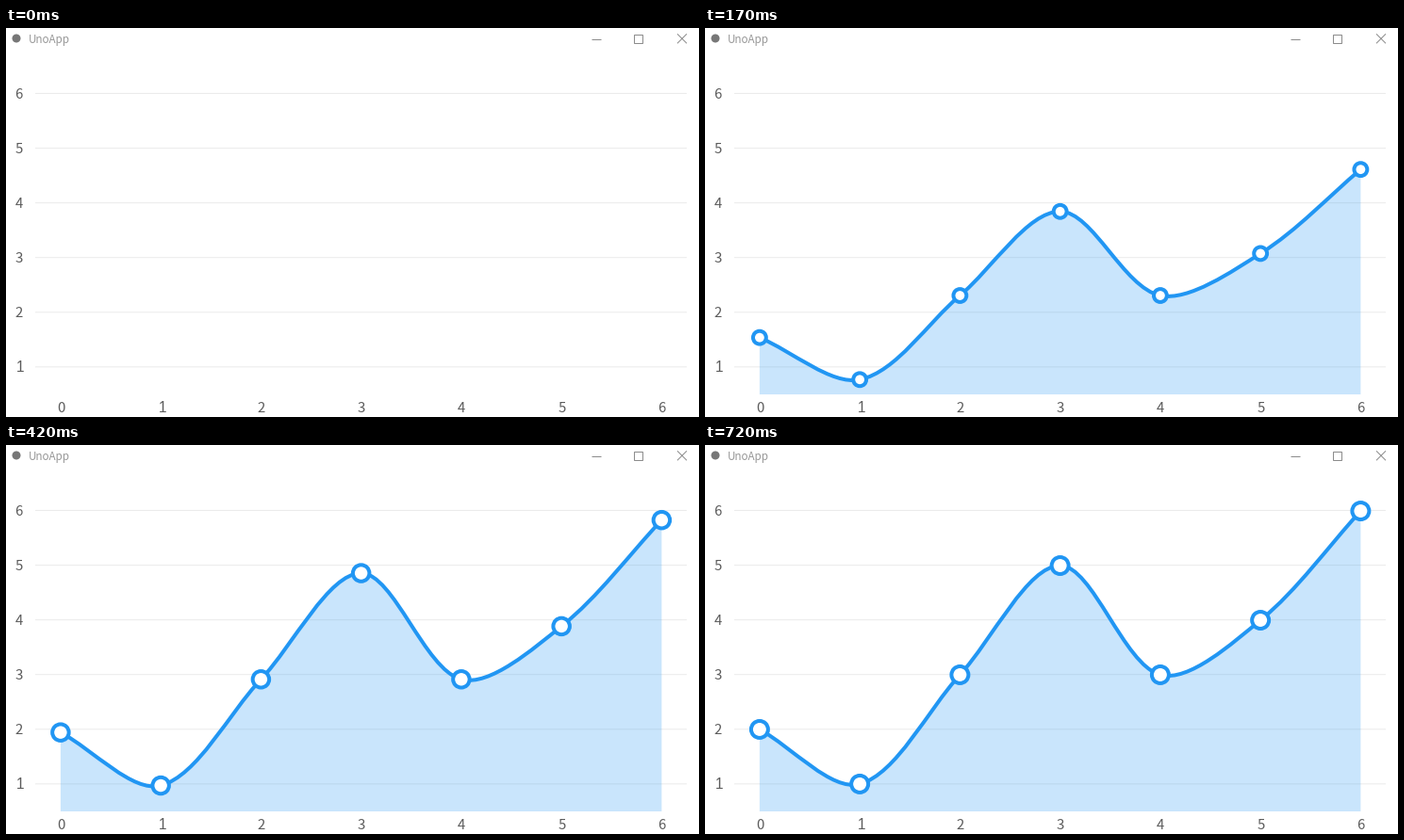
A matplotlib script for the animation above (1.72 s loop, 735x413 px).

```python
import numpy as np
import matplotlib.pyplot as plt
from matplotlib.animation import FuncAnimation
from matplotlib.patches import Circle, PathPatch, Rectangle
from matplotlib.path import Path

W, H, DPI = 735, 413, 100
PX = 72 / DPI                      # points per pixel
LOOP, TICK = 1720, 10              # ms

VALUES = [2, 1, 3, 5, 3, 4, 6]
X0, DX = 57.9, 106.25
Y0, DY = 417.9, 58.07              # pixel of value zero, pixels per unit
LEFT, RIGHT, TOP, BOTTOM = 31, 722, 40, 389
SMOOTH = 0.65
BLUE, GRID, INK, CHROME = "#2196f3", "#ebebeb", "#5c5c5c", "#8c8c8c"

fig = plt.figure(figsize=(W / DPI, H / DPI), dpi=DPI, facecolor="white")
ax = fig.add_axes([0, 0, 1, 1])
ax.set(xlim=(0, W), ylim=(H, 0))
ax.axis("off")


def line(xs, ys, color, snap=None):
    ax.plot(xs, ys, color=color, lw=PX, solid_capstyle="butt", snap=snap)


def label(x, y, text, size=15, color=INK, font="Noto Sans CJK JP", ha="center"):
    ax.text(x, y, text, fontsize=size * PX, color=color, family=font,
            ha=ha, va="baseline")


def digit(x, y, n):
    if n == 1:
        label(x + 1.3, y, "1", 15.5, font="Liberation Sans")
    else:
        label(x, y, str(n))


def spline(pts):
    """Smoothed cubic segments through the points."""
    p = np.vstack([pts[:1], pts, pts[-1:]])
    mid = (p[:-1] + p[1:]) / 2
    size = np.hypot(*(p[1:] - p[:-1]).T)
    verts = [pts[0]]
    for i in range(1, len(pts)):
        m1 = mid[i - 1] + (mid[i] - mid[i - 1]) * size[i - 1] / (size[i - 1] + size[i])
        m2 = mid[i] + (mid[i + 1] - mid[i]) * size[i] / (size[i] + size[i + 1])
        verts += [p[i] + (mid[i] - m1) * SMOOTH,
                  p[i + 1] + (mid[i] - m2) * SMOOTH,
                  p[i + 1]]
    return np.array(verts)


def grow(t):
    """Exponential ease-out."""
    p = min((t + 9) / 850, 1)
    return 1 - (2 ** (-10 * p) - 2 ** -10) * 1.0009775


def step_time(t):
    """Time of the latest redraw."""
    if t < 120:
        return 50
    return min(120 + (t - 120) // 50 * 50, 720)


# window chrome
ax.add_patch(Circle((11, 11), 4.5, color="#777777", lw=0))
label(24, 16, "UnoApp", 11.6, "#999999", ha="left")
line([621, 631], [11.5, 11.5], CHROME)
ax.add_patch(Rectangle((666.5, 6.5), 9, 9, fill=False, ec=CHROME, lw=PX))
line([712, 722], [6.3, 16.3], CHROME)
line([712, 722], [16.3, 6.3], CHROME)

# axes
for v in range(1, 7):
    y = Y0 - DY * v
    line([LEFT, RIGHT], [y, y], GRID, snap=False)
    digit(13.7, y + 5.5, v)
for v in range(7):
    digit(X0 + DX * v + 0.2, 408, v)

# series
points = np.array([(X0 + DX * i, Y0 - DY * v) for i, v in enumerate(VALUES)])
curve = spline(points)
CODES = [Path.MOVETO] + [Path.CURVE4] * (len(curve) - 1)

window = Rectangle((LEFT, TOP), RIGHT - LEFT, BOTTOM - TOP, transform=ax.transData)
area = PathPatch(Path(curve, CODES), fc=BLUE, alpha=0.24, lw=0, zorder=3)
stroke = PathPatch(Path(curve, CODES), fill=False, ec=BLUE, lw=4 * PX, zorder=4)
dots = [Circle(p, 9, fc="white", ec=BLUE, lw=4 * PX, zorder=5) for p in points]
series = [area, stroke, *dots]
for artist in series:
    ax.add_patch(artist)
    artist.set_clip_path(window)


def update(n):
    t = n * TICK
    for artist in series:
        artist.set_visible(t >= 50)
    k = grow(step_time(t))
    verts = curve.copy()
    verts[:, 1] = Y0 + (verts[:, 1] - Y0) * k
    stroke.set_path(Path(verts, CODES))
    floor = [(verts[-1, 0], BOTTOM), (verts[0, 0], BOTTOM)]
    area.set_path(Path(np.vstack([verts, floor]), CODES + [Path.LINETO] * 2))
    for dot, (x, y) in zip(dots, verts[::3]):
        dot.center = x, y
        dot.set_radius(9 * k)
    return series


anim = FuncAnimation(fig, update, frames=LOOP // TICK, interval=TICK,
                     repeat=True, repeat_delay=0, blit=False)
plt.show()
```
